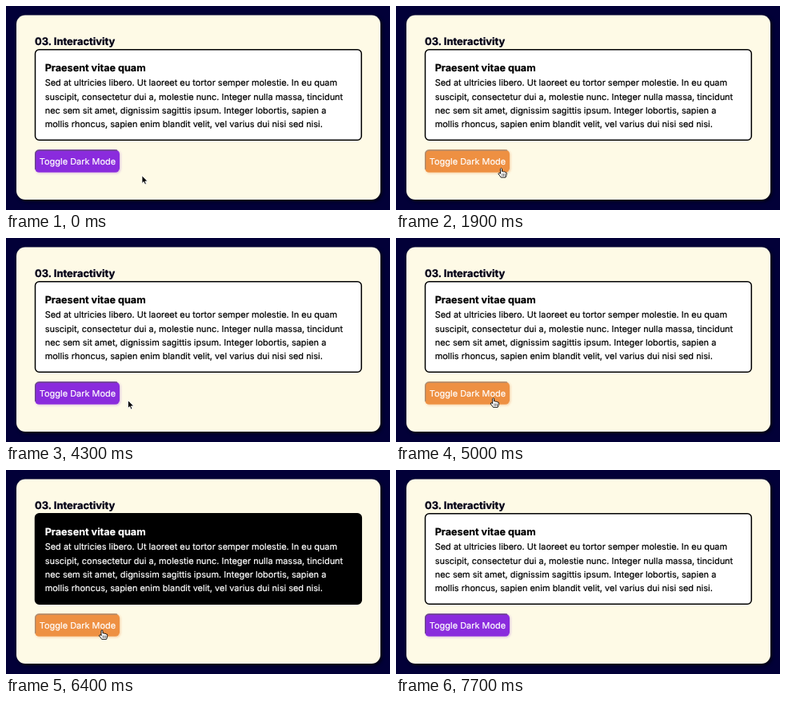
Recreate the animation shown at these times as an HTML page. Size 480 by 256 pixels, loop 8.2 s.

```html
<!DOCTYPE html>
<html lang="en">
<head>
<meta charset="utf-8">
<title>Interactivity</title>
<style>
  html, body { margin: 0; width: 100%; height: 100%; overflow: hidden; background: #020038; }
  svg { display: block; width: 480px; height: 256px; }
  text {
    font: 10.96px Inter, "Open Sans", sans-serif;
    text-rendering: geometricPrecision;
    fill: #000; stroke: #000; stroke-width: .2px;
  }
  .title { font-weight: 700; font-size: 12.6px; }
  .heading {
    font-weight: 700; font-size: 12.95px; fill: #080618; stroke: #080618;
    filter: drop-shadow(.6px .6px .5px #02003866);
  }
  .card { fill: #fefae6; filter: drop-shadow(2px 2px 2px #000b); }
  .panel { fill: #fff; stroke: #000; stroke-width: 1.5px; }
  .button { fill: #8a2bdd; filter: drop-shadow(1.5px 1.5px 1.5px #8a2bdd55); }
  .bevel { fill: none; stroke: #555; stroke-width: 1.4px; opacity: .65; }
  .label { fill: #fff; stroke: #fff; }
  .dark .panel { fill: #000; }
  .dark .copy text { fill: #fff; stroke: #fff; }
  .hover .button { fill: #ee9042; filter: drop-shadow(1.5px 1.5px 1.5px #ee904277); }
  .hover .bevel { stroke: #888; }
  .hand, .hover .arrow { display: none; }
  .hover .hand { display: inline; }
</style>
</head>
<body>
<svg id="stage" viewBox="0 0 480 256">
  <rect width="480" height="256" fill="#020038"/>
  <rect class="card" x="13" y="11.5" width="455" height="231.5" rx="11"/>
  <text class="heading" x="36" y="49">03. Interactivity</text>
  <rect class="panel" x="36.5" y="54.8" width="407.8" height="113.4" rx="5"/>
  <g class="copy">
    <text class="title" x="48.7" y="81.7">Praesent vitae quam</text>
    <text x="48.7" y="100.4">Sed at ultricies libero. Ut laoreet eu tortor semper molestie. In eu quam</text>
    <text x="48.7" y="117.6">suscipit, consectetur dui a, molestie nunc. Integer nulla massa, tincidunt</text>
    <text x="48.7" y="134.8">nec sem sit amet, dignissim sagittis ipsum. Integer lobortis, sapien a</text>
    <text x="48.7" y="151.8">mollis rhoncus, sapien enim blandit velit, vel varius dui nisi sed nisi.</text>
  </g>
  <rect class="button" x="36" y="180.3" width="106" height="28.5" rx="5.5"/>
  <path class="bevel" d="M36.7 205V185.8Q36.7 181 41.5 181H139"/>
  <text class="label" x="41.8" y="199">Toggle Dark Mode</text>
  <g id="cursor" stroke-linejoin="round" stroke-linecap="round">
    <path class="arrow" d="M0 0V9.6L2.2 7.5L3.7 11L5.4 10.3L3.9 6.9H6.9Z"
          fill="#000" stroke="#fff" stroke-width=".8"/>
    <g class="hand" stroke="#000" stroke-width=".9">
      <path d="M-1 6.4V.8Q0-.8 1 .8V4.2Q2.3 3.3 3 4.6Q4.3 3.8 5 5.2Q6.7 4.7 6.8 6.5
               Q6.8 9 5.5 11.6H-.3Q-1.5 9.4-3.6 7.3Q-3.6 5.2-1 6.4Z" fill="#fff"/>
      <path d="M1.2 7.2V9.7M3 7.2V9.7M4.8 7.2V9.7" stroke-width=".6"/>
    </g>
  </g>
</svg>
<script>
const LOOP = 8200;
const DARK_ON = 5300, DARK_OFF = 7100, GONE = 7650;
const stage = document.getElementById('stage');
const cursor = document.getElementById('cursor');

// time, x, y of the pointer tip
const path = [
  [0, 170, 213], [700, 170, 213], [1400, 132, 204], [1900, 131.5, 203.5],
  [2300, 132, 203.5], [2750, 155, 205], [2950, 155, 205], [3700, 152.5, 204],
  [4350, 152.5, 204], [4900, 122, 200.8], [5300, 120, 200.8], [7100, 120, 200.8],
  [7400, 124, 232], [7650, 128, 258]
];

const ease = p => p * p * (3 - 2 * p);

function pointAt(t) {
  const i = path.findIndex(k => k[0] > t);
  if (i < 0) return path[path.length - 1].slice(1);
  const [t0, x0, y0] = path[i - 1], [t1, x1, y1] = path[i];
  const p = ease((t - t0) / (t1 - t0));
  return [x0 + (x1 - x0) * p, y0 + (y1 - y0) * p];
}

function draw(now) {
  const t = now % LOOP;
  const [x, y] = pointAt(t);
  const over = x >= 36 && x <= 142 && y >= 180 && y <= 209;
  stage.classList.toggle('hover', over);
  stage.classList.toggle('dark', t >= DARK_ON && t < DARK_OFF);
  cursor.setAttribute('transform', `translate(${x} ${y})`);
  cursor.style.visibility = t < GONE ? 'visible' : 'hidden';
}

const start = performance.now();
function tick() {
  draw(performance.now() - start);
  requestAnimationFrame(tick);
}
tick();
</script>
</body>
</html>
```
